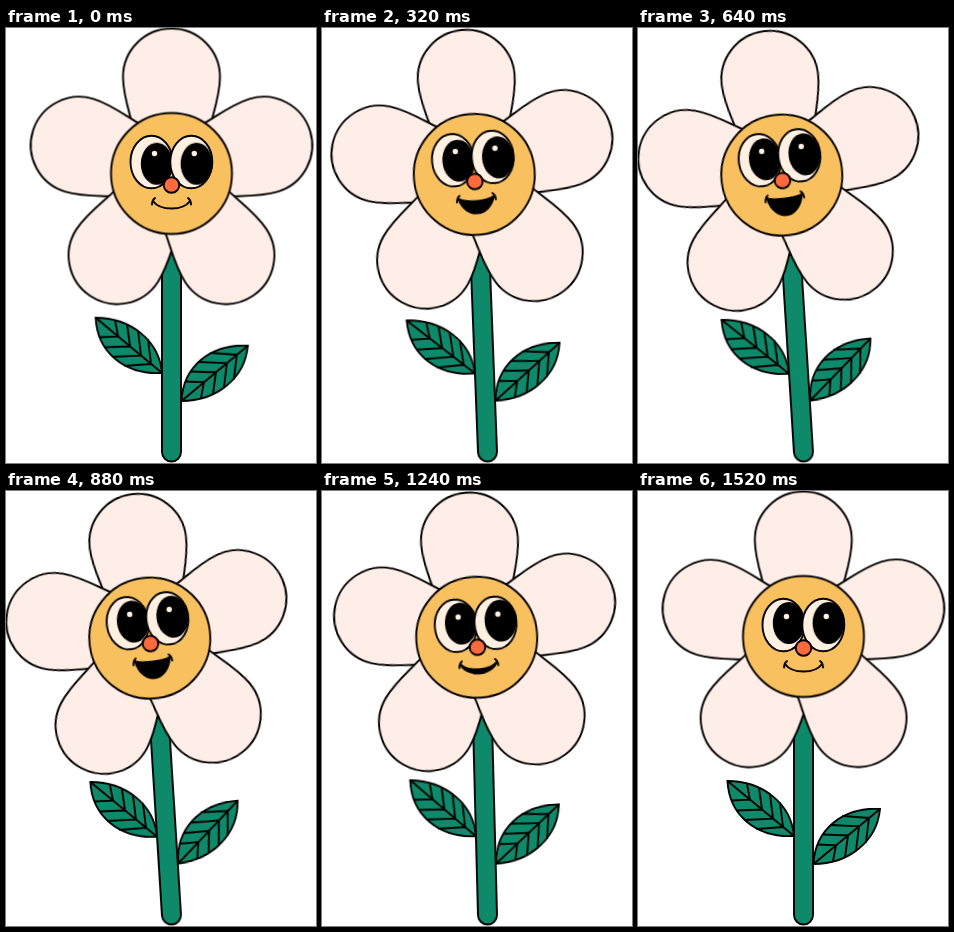
An HTML page without scripts for the animation above (1560 ms loop, 310 by 435 pixels).

```html
<!DOCTYPE html>
<html lang="en">
<head>
<meta charset="utf-8">
<title>Swaying flower</title>
<style>
  html, body { margin: 0; width: 100%; height: 100%; overflow: hidden; background: #fff; }
  svg { display: block; width: 310px; height: 435px; }
  .ink { stroke: #000; stroke-width: 1.9; stroke-linejoin: round; stroke-linecap: round; }
  .line { fill: none; }
  .green { fill: #0e8a6a; }
  .cream { fill: #ffeee8; }

  .plant, .head, .spin, .face, .pupil, .mouth {
    animation: 1560ms cubic-bezier(.333, 0, .667, 1) infinite;
  }
  .plant { transform-origin: 165.5px 424px; animation-name: lean; }
  .head { animation-name: sway; }
  .spin { --tilt: -7.1deg; transform-origin: 0 0; animation-name: spin; }
  .low { --tilt: -5.9deg; }
  .face { animation-name: lift; }
  .pupil { animation-name: look; }
  .mouth { animation-name: grin; }
  .leaf { transform-origin: var(--base); animation: flap 195ms ease-in-out -30ms infinite alternate; }
  .left { --base: 156px 345px; --flap: 4.4deg; }
  .right { --base: 175.5px 373px; --flap: -4.4deg; }

  @keyframes lean {
    0%, 89.74%, 100% { transform: none; }
    35.9%, 66.67% { transform: rotate(-3.6deg); }
  }
  @keyframes sway {
    0%, 94.87%, 100% { transform: translate(0, 0); }
    35.9%, 64.1% { transform: translate(-21.7px, 1.6px); }
  }
  @keyframes spin {
    0%, 100% { transform: rotate(0deg); }
    33.33%, 64.1% { transform: rotate(var(--tilt)); }
  }
  @keyframes lift {
    0%, 87.18%, 100% { transform: translateY(0); }
    30.77%, 64.1% { transform: translateY(-6px); }
  }
  @keyframes look {
    0%, 87.18%, 100% { transform: translateY(0); }
    30.77%, 64.1% { transform: translateY(-4px); }
  }
  @keyframes grin {
    0%, 87.18%, 100% { d: path("M147 173C154 183 177 183 184 173C177 183 154 183 147 173Z"); }
    30.77%, 64.1% { d: path("M148 173C156 176 175 176 183 173C178 198 153 198 148 173Z"); }
  }
  @keyframes flap {
    from { transform: rotate(0deg); }
    to { transform: rotate(var(--flap)); }
  }
</style>
</head>
<body>
<svg viewBox="0 0 310 435">
  <defs>
    <path id="petal" class="ink cream" d="M-37-40C-40-56-48.5-76-48.5-96.5A48.5 48.5 0 0 1 48.5-96.5C48.5-76 40-56 37-40Z"/>
    <g id="leaf" class="ink">
      <path class="green" d="M89.5 290C124 290 153 312 156 345C118 347 91 324 89.5 290Z"/>
      <path class="line" d="M89.5 290L156 345M109 293L112 308.600L94 309.500M121 297L124 318.500L99 319.500M132 303.500L135 327.600L107 329M142 312L145 336L119 338"/>
    </g>
    <g id="eye">
      <ellipse class="ink" fill="#fff0e2" cx="145.5" cy="134" rx="21" ry="26.3"/>
      <ellipse class="pupil" cx="150.8" cy="136" rx="16" ry="21"/>
      <circle fill="#fff0e2" cx="148.5" cy="125.5" r="2.7"/>
    </g>
  </defs>

  <g class="plant">
    <g class="leaf left"><use href="#leaf"/></g>
    <g class="leaf right"><use href="#leaf" transform="matrix(1 0 0 -1 86 663)"/></g>
    <path class="ink green" d="M156 195V424A9.5 9.5 0 0 0 175 424V195Z"/>
  </g>

  <g class="head">
    <g transform="translate(165.5 145.5)">
      <g class="spin">
        <use href="#petal"/>
        <use href="#petal" transform="rotate(-73)"/>
        <use href="#petal" transform="rotate(73)"/>
      </g>
      <g class="spin low">
        <use href="#petal" transform="rotate(-146.500) translate(0 -2)"/>
        <use href="#petal" transform="rotate(146.500) translate(0 -2)"/>
      </g>
      <g class="spin">
        <circle class="ink" fill="#f9c05f" r="60.5"/>
        <g transform="translate(-165.5 -145.5)">
          <g class="face">
            <use href="#eye"/>
            <use href="#eye" x="39.8"/>
            <path class="ink mouth" d="M147 173C154 183 177 183 184 173C177 183 154 183 147 173Z"/>
            <path class="ink line" d="M146 176.500Q146 172 149 170M185 176.500Q185 172 182 170"/>
            <circle class="ink" fill="#ff6a3d" cx="165.5" cy="157" r="7.8"/>
          </g>
        </g>
      </g>
    </g>
  </g>
</svg>
</body>
</html>
```
